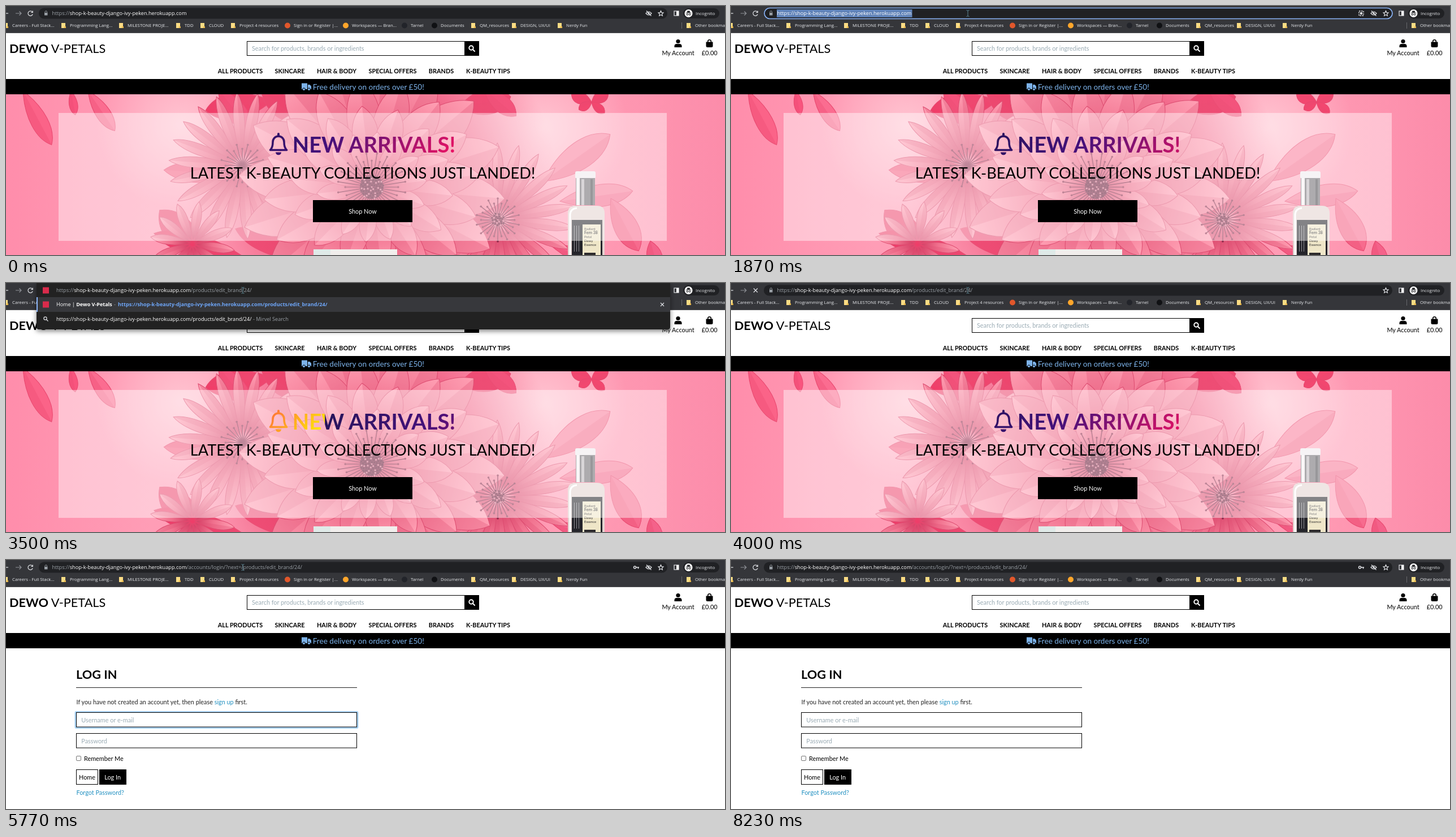
Recreate the animation shown at these times as an HTML page. Size 1272 by 440 pixels, loop 8.3 s.

```html
<!DOCTYPE html>
<html lang="en">
<head>
<meta charset="utf-8">
<title>Shop walkthrough</title>
<style>
  html, body { margin: 0; width: 100%; height: 100%; overflow: hidden; background: #fff; }
  svg { display: block; width: 1272px; height: 440px; }
  text { font-family: Lato, sans-serif; font-size: 10.87px; white-space: pre; }
  .ui text { font-family: "Open Sans", "Noto Sans", sans-serif; font-size: 9.17px; }
  .ui .small { font-size: 7.8px; fill: #e8eaed; }
  .mid { text-anchor: middle; }
  .bold { font-weight: 700; }
  .hint { fill: #9aabb4; }
  .link { fill: #1f8fc0; }
  .dim { fill: #9aa0a6; }
  .line { fill: none; stroke: #dfe1e5; stroke-width: 1.2; }
  .box { fill: #fff; stroke: #000; }
</style>
</head>
<body>
<svg id="stage" viewBox="0 0 1272 440" xmlns="http://www.w3.org/2000/svg"></svg>
<script>
const LOOP = 8300;
const HOST = 'shop-k-beauty-django-ivy-peken.herokuapp.com';
const EDIT = '/products/edit_brand/24/';
const TILE = 664, SWEEP = 2027;   // gradient tile width and time per tile

const text = (x, y, s, cls = '', size = 0, fill = '') =>
  `<text x="${x}" y="${y}" class="${cls}" style="${size ? `font-size:${size}px;` : ''}${fill ? `fill:${fill}` : ''}">${s}</text>`;
const rect = (x, y, w, h, fill, more = '') =>
  `<rect x="${x}" y="${y}" width="${w}" height="${h}" fill="${fill}" ${more}/>`;
const disc = (x, y, r, fill, more = '') => `<circle cx="${x}" cy="${y}" r="${r}" fill="${fill}" ${more}/>`;
const times = (n, f) => Array.from({ length: n }, (_, i) => f(i)).join('');

// ---- hero picture ----
// A pointed petal along the x axis, one half shaded to give it a fold.
function petal(x, y, angle, start, len, w, fill, edge) {
  const a = start + len * .4, b = start + len * .8, tip = start + len;
  const half = side => `C${a} ${side * w} ${b} ${side * w} ${tip} 0`;
  return `<g transform="translate(${x} ${y}) rotate(${angle})">
    <path d="M${start} 0${half(-1)}C${b} ${w} ${a} ${w} ${start} 0Z" fill="${fill}" stroke="${edge}"/>
    <path d="M${start} 0${half(1)}Z" fill="${edge}" opacity=".3"/></g>`;
}
const leaf = ([x, y, angle, len, w, fill]) => petal(x, y, angle, 0, len, w, fill, '#e8486f');
const ring = (x, y, n, turn, start, len, w, fill = 'url(#petal)', edge = '#dd4d71') =>
  times(n, i => petal(x, y, turn + i * 360 / n, start, len, w, fill, edge));
const strands = (x, y, n, r, color) => times(n, i => {
  const a = i * 2 * Math.PI / n, len = r * (i % 2 ? 1 : .78), c = Math.cos(a), s = Math.sin(a);
  return `<path d="M${x} ${y}L${x + c * len} ${y + s * len}" stroke="${color}" stroke-width="1.6"/>` +
    disc(x + c * len, y + s * len, 1.8, color);
});
const seeds = (x, y, n, r) => times(n, i => {
  const a = i * 2.4, d = r * Math.sqrt(i / n);
  return disc(x + d * Math.cos(a), y + d * Math.sin(a), 1.5, i % 3 ? '#5d1631' : '#d77a92');
});

const leaves = [
  [30, 150, 62, 108, 20, '#fb6388'], [115, 150, 80, 43, 10, '#f9547e'], [145, 150, 56, 85, 17, '#fb6c90'],
  [470, 168, 172, 118, 30, '#f03b66'], [375, 146, 52, 90, 24, '#f4507a'], [450, 146, 40, 85, 26, '#ee3a64'],
  [800, 180, -12, 95, 30, '#f04670'], [845, 146, 40, 75, 20, '#f4507a'],
  [425, 300, 184, 146, 24, '#f66486'], [355, 450, 227, 122, 34, '#ee4a72'], [430, 450, 196, 175, 26, '#ee3d69'],
  [545, 450, 202, 150, 26, '#f04670'], [690, 450, -18, 170, 24, '#f4628a'],
  [950, 310, -35, 145, 32, '#f97f9c'], [980, 345, -8, 130, 26, '#f87a99'], [1070, 340, 62, 105, 28, '#f76b8e'],
  [960, 420, 22, 150, 20, '#f4628a'], [1140, 415, 75, 50, 18, '#f4628a']
];
const butterfly = [[-160, 38, 14], [150, 26, 10], [-30, 34, 14], [40, 30, 10]]
  .map(([a, len, w]) => leaf([1036, 170, a, len, w, '#f2476f'])).join('');

const bottle = `
  ${rect(1007, 292, 36, 13, '#eeeaec', 'rx="3"')}${rect(1008, 304, 34, 48, '#6e6b70')}
  ${rect(1009, 304, 6, 48, '#f4eef0')}${rect(1018, 306, 5, 46, '#b9b5b9')}${rect(1034, 306, 4, 46, '#4a484d')}
  <path d="M994 440V366Q994 353 1008 353H1045Q1059 353 1059 366V440Z" fill="#e3d2cf"/>
  <path d="M998 440V368Q999 358 1010 357" fill="none" stroke="#fff" stroke-width="3"/>
  ${rect(1001, 378, 54, 62, '#24242a')}${rect(1020, 386, 32, 54, '#efe6c8')}
  ${['Radiant', 'Fern 38', 'Petal', 'Dewy', 'Essence'].map((s, i) =>
    text(1023, 396 + i * 7, s, i == 1 ? 'bold' : '', i == 1 ? 7 : 6, '#2c2a2c')).join('')}
  ${times(3, i => rect(1005 + i * 4, 388, 1, 46, '#8d8c92'))}
  ${rect(1023, 436, 20, 4, '#2c2a2c')}`;

const hero = `<g id="hero">
  ${rect(0, 156, 1272, 284, 'url(#sky)')}
  <g clip-path="url(#heroClip)" fill="none">
    ${disc(310, 210, 150, 'url(#glow1)')}${disc(950, 215, 150, 'url(#glow1)')}
    ${leaves.map(leaf).join('')}${butterfly}
    ${disc(647, 320, 330, 'url(#shadow)')}
    ${ring(418, 282, 22, 4, 14, 116, 13)}
    ${strands(418, 282, 24, 38, '#8f2c4d')}
    ${ring(872, 376, 22, 7, 14, 120, 13)}
    ${ring(330, 420, 12, 9, 5, 70, 11)}
    ${ring(647, 320, 16, 5, 20, 216, 52)}
    ${ring(647, 320, 16, 16, 20, 172, 40)}
    ${ring(647, 320, 14, 6, 18, 126, 31)}
    ${ring(647, 320, 14, 19, 14, 84, 20)}
    ${strands(647, 320, 40, 60, '#8d2747')}${disc(647, 320, 21, '#78203f')}${seeds(647, 320, 70, 21)}
    ${strands(870, 378, 28, 38, '#8a2a49')}${seeds(870, 378, 30, 12)}
    ${rect(544, 430, 148, 10, '#f1eeec')}${rect(544, 430, 30, 10, '#dfeae8')}
    ${bottle}
  </g>
  ${rect(93, 189, 1076, 226, '#fff', 'fill-opacity=".43"')}
  <g mask="url(#headline)"><g id="sweep">
    ${times(2, i => `<rect width="${TILE}" height="46" transform="translate(${i * TILE} 222)" fill="url(#rainbow)"/>`)}
  </g></g>
  ${text(631, 304.5, 'LATEST K-BEAUTY COLLECTIONS JUST LANDED!', 'mid', 27.2)}
  ${rect(543, 343, 176, 39, '#000')}${text(631, 367, 'Shop Now', 'mid', 0, '#fff')}
</g>`;

const defs = `<defs>
  <linearGradient id="sky"><stop stop-color="#ff8dab"/><stop offset=".2" stop-color="#ff9db6"/>
    <stop offset=".8" stop-color="#ff9bb4"/><stop offset="1" stop-color="#fc8caa"/></linearGradient>
  <linearGradient id="petal"><stop stop-color="#d23c62"/><stop offset=".45" stop-color="#f0708d"/>
    <stop offset="1" stop-color="#ffa0b4"/></linearGradient>
  <radialGradient id="glow1"><stop stop-color="#ffc4d1"/><stop offset="1" stop-color="#ffc4d1" stop-opacity="0"/></radialGradient>
  <radialGradient id="shadow"><stop offset=".5" stop-color="#e8466e" stop-opacity=".75"/>
    <stop offset="1" stop-color="#f26a8c" stop-opacity="0"/></radialGradient>
  <linearGradient id="rainbow" gradientUnits="userSpaceOnUse" x1="154.5" y1="-154.5" x2="509.5" y2="200.5">
    <stop stop-color="#231557"/><stop offset=".29" stop-color="#44107a"/>
    <stop offset=".67" stop-color="#ff1361"/><stop offset="1" stop-color="#fff800"/></linearGradient>
  <clipPath id="heroClip"><rect y="156" width="1272" height="284"/></clipPath>
  <mask id="headline" maskUnits="userSpaceOnUse" x="440" y="215" width="400" height="60">
    ${text(651, 258.8, 'NEW ARRIVALS!', 'mid bold', 38.2, '#fff')}
    <path d="M467.5 254.5Q472 250 472 240.5A10 10.5 0 0 1 492 240.5Q492 250 496.5 254.5Z" fill="none" stroke="#fff" stroke-width="3.6" stroke-linejoin="round"/>
    <path d="M482 226V230" stroke="#fff" stroke-width="4" stroke-linecap="round"/>
    <path d="M477 258.5H487A5 4.8 0 0 1 477 258.5Z" fill="#fff"/>
  </mask>
  <filter id="shade" x="-5%" y="-20%" width="110%" height="160%"><feDropShadow dx="0" dy="3" stdDeviation="4" flood-opacity=".5"/></filter>
</defs>`;

// ---- shop header ----
const header = `
  ${rect(0, 48, 1272, 81, '#fff')}
  ${text(6, 82.5, '<tspan class="bold">DEWO</tspan> V-PETALS', '', 21.7)}
  <rect x="426.5" y="62.5" width="385" height="25" class="box"/>
  ${text(435, 79.3, 'Search for products, brands or ingredients', 'hint')}
  ${rect(811, 62, 26, 26, '#000')}
  <g fill="none" stroke="#fff" stroke-width="2"><circle cx="823" cy="74" r="3.7"/><path d="M825.8 76.8L829 80" stroke-linecap="round"/></g>
  ${disc(1189, 62.5, 3.6, '#000')}<path d="M1182.5 73V71Q1182.5 67 1186.5 67H1191.5Q1195.5 67 1195.5 71V73Z"/>
  <path d="M1238.5 63.5H1250.5V70.5Q1250.5 73 1248 73H1241Q1238.5 73 1238.5 70.5Z"/>
  <path d="M1241.7 65V62.5A2.8 2.8 0 0 1 1247.3 62.5V65" fill="none" stroke="#000" stroke-width="1.6"/>
  ${text(1189, 87, 'My Account', 'mid')}${text(1244.7, 87, '£0.00', 'mid')}
  ${[[414.5, 'ALL PRODUCTS'], [502, 'SKINCARE'], [585, 'HAIR &amp; BODY'], [684, 'SPECIAL OFFERS'], [770, 'BRANDS'], [853, 'K-BEAUTY TIPS']]
    .map(([x, s]) => text(x, 119.3, s, 'mid bold')).join('')}
  ${rect(0, 129, 1272, 27, '#000')}
  <g fill="#7db3ea"><path d="M523 136.5H533V147H523ZM534 139H537.5L540 142V147H534Z"/>
    ${[527, 536].map(x => disc(x, 147.3, 2.4, '#7db3ea', 'stroke="#000"')).join('')}</g>
  ${text(641.3, 147.8, 'Free delivery on orders over £50!', 'mid', 13.6, '#7db3ea')}`;

// ---- log-in page ----
const login = `<g id="login">
  ${rect(0, 156, 1272, 284, '#fff')}
  ${text(124, 209.6, 'LOG IN', 'bold', 21.7)}
  ${rect(124, 225, 497, 1, '#222')}
  ${text(124.5, 254.8, 'If you have not created an account yet, then please <tspan class="link">sign up</tspan> first.', '', 0, '#222')}
  <rect id="halo" x="123" y="268.5" width="499" height="28" rx="1.5" fill="none" stroke="#a9d2f3" stroke-width="3"/>
  ${[269.5, 306.5].map(y => `<rect x="124.5" y="${y}" width="496" height="25.5" class="box"/>`).join('')}
  ${text(133.3, 287, 'Username or e-mail', 'hint')}${text(133.3, 324, 'Password', 'hint')}
  ${rect(133, 276, 1, 13, '#000', 'id="caret"')}
  <rect x="124.5" y="346.5" width="8" height="8" rx="1.5" fill="#fff" stroke="#767676"/>
  ${text(138, 355, 'Remember Me')}
  <rect x="124.5" y="370.5" width="38" height="26" class="box"/>${text(143.5, 388, 'Home', 'mid')}
  ${rect(165, 370, 48, 27, '#000')}${text(188.7, 388, 'Log In', 'mid', 0, '#fff')}
  ${text(124.5, 415, 'Forgot Password?', 'link')}
</g>`;

// ---- browser bar ----
const folder = x => `<path d="M${x - 4} 30H${x + 3}V39H${x - 4}Z" fill="#fbdc84"/>${rect(x + 1, 36, 3, 3, '#e9b94c')}`;
const bookmarks = [
  [0, 'Careers - Full Stack...'], [102, 'Programming Lang...'], [204, 'MILESTONE PROJE...'], [305, 'TDD'],
  [348, 'CLOUD'], [402, 'Project 4 resources'], [498, 'Sign in or Register |...', '#e2572b'],
  [601, 'Workspaces — Bran...', '#ffa62b'], [705, 'Tarnel', '#22242a'], [758, 'Documents', '#101114'],
  [827, 'QM_resources'], [899, 'DESIGN, UX/UI'], [980, 'Nerdy Fun'], [1208, 'Other bookmarks']
].map(([x, s, mark]) => (mark ? disc(x, 34.5, 5, mark) : folder(x)) + text(x + 11, 37.3, s, 'small')).join('');

const key = x => `<g fill="none" stroke="#dfe1e5" stroke-width="1.5"><circle cx="${x - 2.5}" cy="13" r="2"/><path d="M${x - .5} 13H${x + 5}M${x + 3.5} 13V15.5"/></g>`;
const address = (id, path, from = 81.5) =>
  `<g id="${id}">${text(from, 16.2, `<tspan class="dim">https://</tspan><tspan fill="#fff">${HOST}</tspan><tspan class="dim">${path}</tspan>`)}</g>`;

const bar = `<g class="ui">
  ${rect(0, 0, 1272, 48, '#35363a')}${rect(0, 47, 1272, 1, '#505155')}
  <path class="line" d="M-4 13H4"/>
  <path d="M17 13H27M23.5 9.5L27 13L23.5 16.5" fill="none" stroke="#8f9297" stroke-width="1.2"/>
  <path id="reload" class="line" d="M46.5 10.5A4.2 4.2 0 1 0 47.2 14.5M47.3 8.5V11.5H44.2"/>
  <path id="stop" class="line" d="M40 9.5L47 16.5M47 9.5L40 16.5"/>
  <rect x="58" y="3.5" width="1112" height="19" rx="9.5" fill="#202124"/>
  <rect id="focus" x="59" y="3.5" width="1111" height="19" rx="9.5" fill="none" stroke="#8ab4f8" stroke-width="1.7"/>
  ${rect(68, 12, 5.5, 4.5, '#9aa0a6')}<path d="M69 12V10.5A1.7 1.7 0 0 1 72.5 10.5V12" fill="none" stroke="#9aa0a6"/>
  ${rect(81, 6, 239.5, 14, '#5f82b8', 'id="select"')}
  ${address('urlHome', '')}${address('urlEdit', EDIT)}${address('urlLogin', '/accounts/login/?next=' + EDIT)}
  <g id="urlMarked">${text(81.5, 16.2, 'https://' + HOST, '', 0, '#fff')}</g>
  <g id="grid"><rect x="1111" y="9" width="8" height="8" fill="none" stroke="#dfe1e5" stroke-width="1.4" stroke-dasharray="2.6 1.4"/>
    ${rect(1113, 11, 4, 4, '#dfe1e5')}</g>
  <g id="keyLeft">${key(1115)}</g><g id="keyRight">${key(1137)}</g>
  <g id="eye" class="line"><path d="M1132 13Q1137 7 1142 13Q1137 19 1132 13ZM1133 8.5L1141.5 17.5"/>${disc(1137, 13, 1.2, '#dfe1e5')}</g>
  <path class="line" d="M1158.5 8.5L1159.8 11.6L1163 11.9L1160.6 14.1L1161.3 17.3L1158.5 15.6L1155.7 17.3L1156.4 14.1L1154 11.9L1157.2 11.6Z"/>
  <rect x="1182" y="9" width="8" height="8" class="line"/>${rect(1186, 9, 4, 8, '#fff')}
  <rect x="1198" y="4" width="64" height="18" rx="9" fill="#202124"/>${disc(1207.5, 13, 7, '#fff')}
  <path d="M1204.5 11.5L1205.5 8.5H1209.5L1210.5 11.5ZM1202.5 11.7H1212.5V12.6H1202.5Z" fill="#202124"/>
  ${[1205.3, 1209.7].map(x => disc(x, 15, 1.4, 'none', 'stroke="#202124"')).join('')}
  ${text(1220, 16, 'Incognito', 'small', 7.9)}
  ${bookmarks}${rect(1195, 29, 1, 11, '#66686c')}
</g>`;

const dropdown = `<g id="dropdown" class="ui">
  <path d="M54 0H1175V78Q1175 82 1171 82H58Q54 82 54 78Z" fill="#202124" filter="url(#shade)"/>
  ${rect(54, 25, 1121, 26, '#37383c')}${rect(54, 25, 2, 26, '#8ab4f8')}
  ${[13, 38].map(y => rect(65, y - 5.5, 11, 11, '#d92b4b')).join('')}
  <g class="line"><circle cx="69.5" cy="62.5" r="2.6"/><path d="M71.5 64.5L74.5 67.5"/></g>
  ${address('urlTyped', EDIT, 89)}
  ${text(89, 41.2, 'Home | <tspan class="bold">Dewo V-Petals</tspan>', '', 9, '#fff')}
  ${text(191, 41.2, '-', 'dim')}
  ${text(198, 41.2, 'https://' + HOST + EDIT, 'bold', 9.17, '#6ea6f8')}
  <path class="line" d="M1158 35L1164 41M1164 35L1158 41"/>
  ${text(89, 67.2, 'https://' + HOST + EDIT, '', 0, '#fff')}${text(437, 67.2, '- Mirvel Search', 'dim')}
</g>`;

const pointers = `
  <path id="beam" d="M416.5 7.5Q419 7.5 419 9V17Q419 18.5 416.5 18.5M421.5 7.5Q419 7.5 419 9M419 17Q419 18.5 421.5 18.5" fill="none" stroke="#5c8592"/>
  <path id="arrow" d="M0 0V14L3.3 11L5.7 16.5L7.8 15.6L5.5 10.2H10Z" fill="#fff" stroke="#000" stroke-width=".9"/>`;

const stage = document.getElementById('stage');
stage.innerHTML = defs + header + hero + login + bar + dropdown + pointers;

const parts = {};
stage.querySelectorAll('[id]').forEach(el => parts[el.id] = el);
const show = (id, on) => parts[id].style.display = on ? '' : 'none';
const within = (t, a, b) => t >= a && t < b;
const clamp = v => Math.max(0, Math.min(1, v));

// Moments at which the browser state switches.
const FOCUS = 1640, SELECT = 1840, PASTE = 3150, ENTER = 3720, PAGE = 4070, LOADED = 4310, BLUR = 8090;
const caretSpans = [[PAGE, 4690], [5250, 5770], [6300, 6830], [7340, 7870]];

function arrowAt(t) {
  if (within(t, 70, 860)) {
    const p = (t - 70) / 790;
    return [1210 - 791 * p, 420 - 407 * p];
  }
  if (within(t, 6080, 6910)) {
    const p = (t - 6080) / 830;
    return [419 + 679 * (1 - (1 - p) ** 2 * .8 - (1 - p) * .2), 13 + 361 * p];
  }
  if (within(t, 6910, 7070)) {
    const p = clamp((t - 6910) / 80);
    return [1098 + 14 * p, 374 + 33 * p];
  }
  return null;
}

function draw(t) {
  const onHero = t < PAGE, marked = within(t, SELECT, PASTE), loading = within(t, ENTER, LOADED);
  show('hero', onHero);
  show('login', !onHero);
  show('dropdown', within(t, PASTE, ENTER));
  show('focus', within(t, FOCUS, ENTER));
  show('select', marked);
  show('urlMarked', marked);
  show('urlHome', t < SELECT);
  show('urlEdit', within(t, PASTE, PAGE));
  show('urlLogin', !onHero);
  show('stop', loading);
  show('reload', !loading);
  show('grid', within(t, FOCUS, PASTE));
  show('eye', !loading);
  show('keyRight', within(t, PAGE, LOADED));
  show('keyLeft', t >= LOADED);
  show('caret', caretSpans.some(([a, b]) => within(t, a, b)));
  parts.halo.style.opacity = clamp((t - 4170) / 140) * (1 - clamp((t - BLUR) / 130));

  const edge = ((1047 - TILE * t / SWEEP) % TILE + TILE) % TILE;
  parts.sweep.setAttribute('transform', `translate(${edge < 440 ? edge : edge - TILE} 0)`);

  const spot = arrowAt(t);
  show('arrow', spot);
  if (spot) parts.arrow.setAttribute('transform', `translate(${spot[0]} ${spot[1]})`);
  show('beam', within(t, 860, 6080));
}

const begin = performance.now();
function tick() {
  draw((performance.now() - begin) % LOOP);
  requestAnimationFrame(tick);
}
draw(0);
requestAnimationFrame(tick);
</script>
</body>
</html>
```
